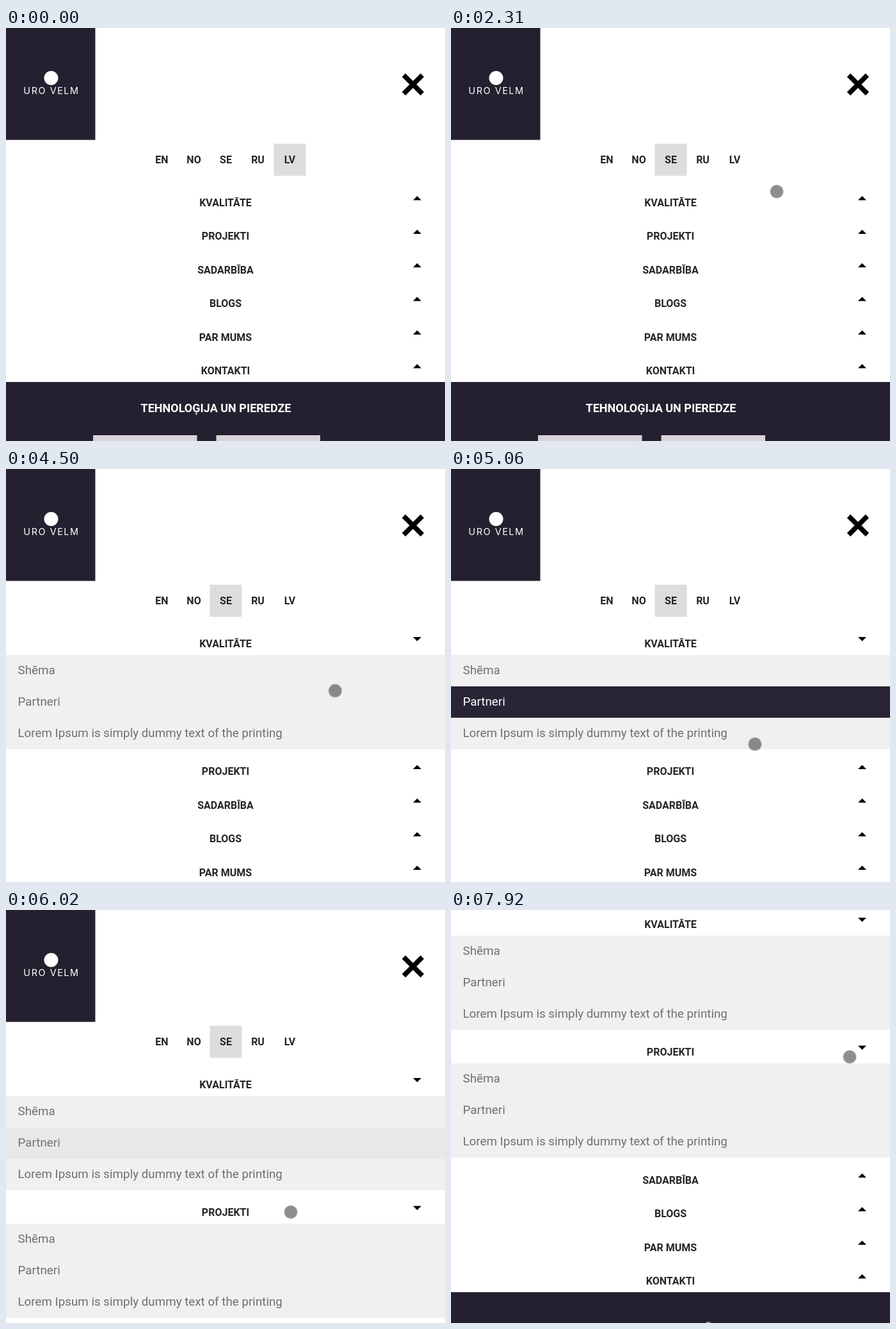
These frames come from a looping animation (686 by 644 pixels, 7.99 s). An HTML page with a canvas:

```html
<!DOCTYPE html>
<html lang="lv">
<head>
<meta charset="utf-8">
<title>Menu</title>
<style>
html, body { margin: 0; width: 100%; height: 100%; overflow: hidden; background: #fff; }
canvas { display: block; }
</style>
</head>
<body>
<canvas id="stage" width="686" height="644"></canvas>
<script>
const ctx = document.getElementById('stage').getContext('2d');
const LOOP = 7990, W = 686, H = 644;
const DARK = '#252030', INK = '#252528';
const LANGS = ['EN', 'NO', 'SE', 'RU', 'LV'];
const ROWS = ['KVALITĀTE', 'PROJEKTI', 'SADARBĪBA', 'BLOGS', 'PAR MUMS', 'KONTAKTI'];
const ITEMS = ['Shēma', 'Partneri', 'Lorem Ipsum is simply dummy text of the printing'];
const ROWS_TOP = 237.5, ROW_H = 52.4, ITEM_H = 49;
const OPEN_AT = [3160, 5850];

// The pointer rests between moves; each move ends at (x, y).
const POINTER_START = { at: 340, x: 494, y: 421 };
const MOVES = [
  { from: 340, to: 900, x: 394, y: 207 },
  { from: 1140, to: 1510, x: 349, y: 203 },
  { from: 1930, to: 2530, x: 601, y: 285 },
  { from: 2780, to: 2860, x: 601, y: 267 },
  { from: 3940, to: 4730, x: 479, y: 378 },
  { from: 4820, to: 5060, x: 475, y: 429 },
  { from: 5060, to: 5620, x: 445, y: 471 },
  { from: 6250, to: 6580, x: 430, y: 542 },
  { from: 6730, to: 6890, x: 485, y: 479 },
  { from: 7300, to: 7760, x: 623, y: 229 }
];

const progress = (t, start, end) => Math.min(1, Math.max(0, (t - start) / (end - start)));
const mix = (a, b, p) => a + (b - a) * p;
const fade = (t, start) => 1 - (1 - progress(t, start, start + 212)) ** 2;
const blend = (a, b, p) => `rgb(${a.map((v, i) => Math.round(mix(v, b[i], p)))})`;

// Accelerating scroll in five jumps of 80 ms.
const scrollAt = t => 250 * (Math.floor(progress(t, 6730, 7130) * 5) / 5) ** 2.3;

function rect(x, y, w, h, color) {
  ctx.fillStyle = color;
  ctx.fillRect(x, y, w, h);
}

function disc(x, y, r, color) {
  ctx.fillStyle = color;
  ctx.beginPath();
  ctx.arc(x, y, r, 0, 7);
  ctx.fill();
}

function text(str, x, y, font, color, align = 'center') {
  ctx.font = font + ', sans-serif';
  ctx.fillStyle = color;
  ctx.textAlign = align;
  ctx.fillText(str, x, y);
}

function arrow(y, open) {
  const [base, tip] = open ? [y, y + 6.5] : [y + 6.5, y];
  ctx.fillStyle = '#000';
  ctx.beginPath();
  ctx.moveTo(636, base);
  ctx.lineTo(649, base);
  ctx.lineTo(642.5, tip);
  ctx.fill();
}

function drawPage() {
  rect(0, 552, W, 800, DARK);
  text('TEHNOLOĢIJA UN PIEREDZE', 328, 598.5, 'bold 18px Roboto', '#fff');
  for (const x of [136, 328.5]) rect(x, 635, 162.5, 120, '#d8d3d8');
  disc(402, 898, 6, '#9aa4ad');
}

function drawCross(x, y, r) {
  ctx.strokeStyle = '#000';
  ctx.lineWidth = 7.5;
  ctx.beginPath();
  for (const side of [-r, r]) {
    ctx.moveTo(x - side, y - r);
    ctx.lineTo(x + side, y + r);
  }
  ctx.stroke();
}

function drawHeader(t) {
  rect(0, 0, 139.5, 174.5, DARK);
  disc(70.5, 78, 11, '#fff');
  ctx.letterSpacing = '1.5px';
  text('URO VELM', 71, 103, '14.5px Inter', '#fff');
  ctx.letterSpacing = '0px';
  drawCross(636, 88, 14.5);

  const active = 4 - (t >= 1140) - (t >= 1930);
  rect(218.5 + active * 50, 180.5, 50, 50, '#ddd');
  LANGS.forEach((lang, i) => text(lang, 243.5 + i * 50, 210.5, 'bold 16px Roboto', INK));
}

function drawSubmenu(y, hover) {
  rect(0, y, W, ITEM_H * 3, '#f0f0f0');
  ITEMS.forEach((item, i) => {
    const p = i === 1 ? hover : 0;
    const top = y + i * ITEM_H;
    if (p) rect(0, top, W, ITEM_H, blend([240, 240, 240], [42, 37, 53], p));
    text(item, 18.5, top + 30, '18.8px Roboto', blend([112, 112, 112], [255, 255, 255], p), 'left');
  });
}

function drawMenu(t) {
  const open = ROWS.map((_, i) => t >= OPEN_AT[i]);
  const openCount = open.filter(Boolean).length;
  rect(0, 0, W, ROWS_TOP + ROWS.length * ROW_H + openCount * ITEM_H * 3, '#fff');
  drawHeader(t);

  let y = ROWS_TOP;
  ROWS.forEach((row, i) => {
    if (open[i] && t < OPEN_AT[i] + 100) rect(0, y, W, ROW_H, '#f9fdff');
    text(row, 343, y + 40.5, 'bold 16px Roboto', INK);
    arrow(y + 24.5, open[i]);
    y += ROW_H;
    if (open[i]) {
      drawSubmenu(y, i === 0 ? fade(t, 4820) - fade(t, 5850) : 0);
      y += ITEM_H * 3;
    }
  });
}

function drawPointer(t) {
  if (t < POINTER_START.at) return;
  let { x, y } = POINTER_START;
  for (const move of MOVES) {
    const p = progress(t, move.from, move.to);
    x = mix(x, move.x, p);
    y = mix(y, move.y, p);
  }
  disc(x, y, 11, 'rgba(80,80,80,.2)');
  disc(x, y, 10, 'rgba(80,80,80,.56)');
}

function draw() {
  const t = performance.now() % LOOP;
  const scroll = scrollAt(t);
  rect(0, 0, W, H, '#fff');
  ctx.save();
  ctx.translate(0, -Math.round(scroll));
  drawPage();
  drawMenu(t);
  ctx.restore();
  if (scroll && t < 7500) rect(678, 5 + scroll * 0.133, 3, 85, '#bbb');
  drawPointer(t);
  requestAnimationFrame(draw);
}
draw();
</script>
</body>
</html>
```
